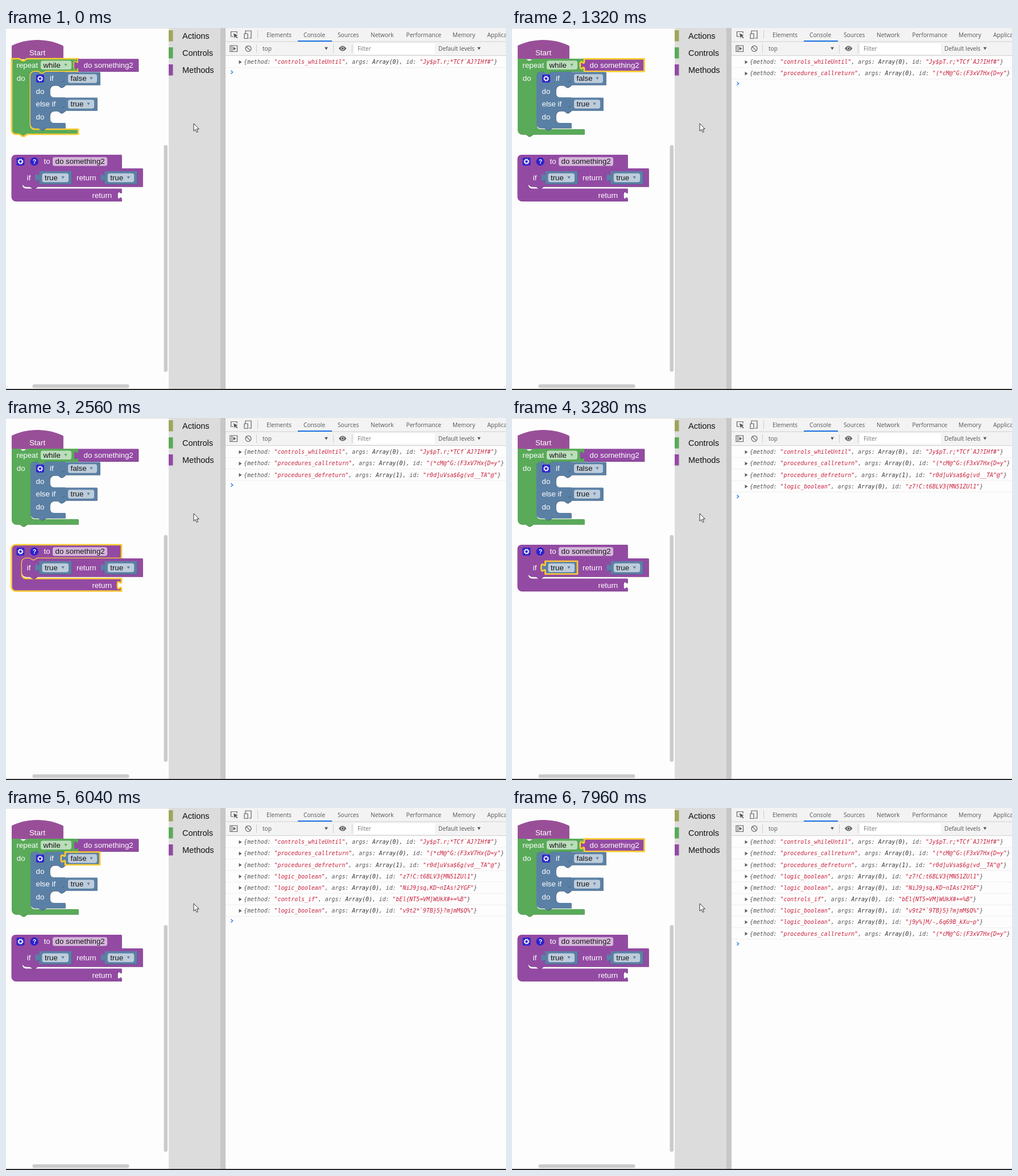
An HTML page for the animation above (8 s loop, 879x637 px).

```html
<!DOCTYPE html>
<html lang="en">
<head>
<meta charset="utf-8">
<title>Block program run</title>
<style>
  html, body { margin: 0; width: 100%; height: 100%; overflow: hidden; background: #fdfdfd; }
  svg { display: block; width: 879px; height: 637px; }
  text { white-space: pre; }
  .label { font: 13.3px "Liberation Sans", Arial, sans-serif; fill: #fff; }
  .value { fill: #151515; }
  .menu { font: 14.5px "Liberation Sans", Arial, sans-serif; fill: #111; }
  .tool { font: 10.2px "Open Sans", "Noto Sans", sans-serif; fill: #555; }
  .log { font: italic 9.88px "DejaVu Sans Mono", monospace; fill: #565656; font-variant-ligatures: none; }
  .log .str { fill: #c8203c; }
  .log .val { fill: #333; }
  .icon { fill: none; stroke: #626262; stroke-width: 1.2; }
  .selected { stroke: #fc3; stroke-width: 2.7; }
</style>
</head>
<body>
<svg id="stage" viewBox="0 0 879 637"></svg>
<script>
const LOOP = 8000;
const STEPS = [0, 840, 1800, 2800, 3800, 4800, 5800, 6800, 7800];
const ROW = 20.15;
const GREEN = '#59aa59', BLUE = '#5b80a5', PURPLE = '#934aa3';

// Block, method name, argument count and id for each step
const CALLS = [
  ['loop', 'controls_whileUntil', 0, 'Jy$pT.r;*TCf`AJ?IHf#'],
  ['call', 'procedures_callreturn', 0, '(*cM@^G:(F3xV7Hx{D=y'],
  ['define', 'procedures_defreturn', 1, 'r0d]uVsa$6g(vd__TA^@'],
  ['test', 'logic_boolean', 0, 'z7!C:t6BLV3{MN51ZUl1'],
  ['result', 'logic_boolean', 0, 'NiJ9jsq,KD~nIAs!2YGF'],
  ['branch', 'controls_if', 0, 'bEl{NT5=VM]WUkX#+=%B'],
  ['first', 'logic_boolean', 0, 'v9t2*`9TB}5}?mjmM$Q%'],
  ['second', 'logic_boolean', 0, 'j9y%]M/-,6q69B_kXu~p'],
  ['call', 'procedures_callreturn', 0, '(*cM@^G:(F3xV7Hx{D=y'],
];

// Path pieces: notches along an edge, puzzle tabs, rounded corners
const NOTCH = 'l5.4,3.6h2.7l5.4,-3.6';
const NOTCH_BACK = 'l-5.4,3.6h-2.7l-5.4,-3.6';
const TAB = 'c0,9,-7.2,-7.2,-7.2,6.75s7.2,-2.25,7.2,6.75';
const TAB_UP = 'c0,-9,-7.2,7.2,-7.2,-6.75s7.2,2.25,7.2,-6.75';
const corner = (dx, dy, sweep) => `a7.2,7.2,0,0,${sweep},${dx * 7.2},${dy * 7.2}`;
const TOP_LEFT = corner(1, -1, 1);
const BOTTOM_LEFT = corner(-1, -1, 1);
const slot = (x, top, bottom, right) =>
  `V${top}H${x + 27}${NOTCH_BACK}H${x + 7.2}${corner(-1, 1, 0)}V${bottom - 7.2}${corner(1, 1, 0)}H${right}`;

const rect = (x, y, w, h, fill, rx = 0) =>
  `<rect x="${x}" y="${y}" width="${w}" height="${h}" rx="${rx}" fill="${fill}"/>`;
const text = (x, y, str, cls = 'label') => `<text x="${x}" y="${y}" class="${cls}">${str}</text>`;
const path = (d, attrs) => `<path d="${d}" ${attrs}/>`;
const icon = d => path(d, 'class="icon"');
const block = (id, d, color) =>
  path(d, `fill="${color}" transform="translate(.8 .8)" style="filter:brightness(.8)"`) +
  path(d, `id="${id}" fill="${color}"`);
const valueBlock = (id, x, y, w, h, color) =>
  block(id, `M${x},${y}h${w}v${h}h${-w}V${y + 18}${TAB_UP}Z`, color);
const field = (x, y, w, str) =>
  rect(x, y, w, 15.5, 'rgba(255,255,255,.6)', 3.6) + text(x + 4.5, y + 12.2, str, 'label value');
const arrow = (x, y, size, color) =>
  path(`M${x - size},${y - size * .8}h${size * 2}l${-size},${size * 1.7}Z`, `fill="${color}"`);
const dropdown = (x, y, w, str, color) => field(x, y, w, str) + arrow(x + w - 10, y + 7.5, 2.6, color);
const boolBlock = (id, x, y, w, str) =>
  valueBlock(id, x, y, w, 22.5, BLUE) + dropdown(x + 5, y + 3.7, w - 10, str, BLUE);
const gear = (x, y) =>
  rect(x - 7, y - 7, 14, 14, '#2b22cb', 3) +
  `<g fill="none" stroke="#fff"><circle cx="${x}" cy="${y}" r="3.1" stroke-width="1.5"/>` +
  `<circle cx="${x}" cy="${y}" r="4.4" stroke-width="1.4" stroke-dasharray="1.7 1.756"/></g>`;

function workspace() {
  return rect(0, 0, 286, 1, '#ddd') +
    rect(277.5, 206, 6.5, 399, '#cbcbcb', 3.2) + rect(46.5, 627, 170, 6.5, '#cbcbcb', 3.2) +
    block('start', 'M10,54V31c27,-13.5,63,-13.5,90,0V54Z', '#994f98') + text(41, 47.5, 'Start') +

    block('loop', `M10,54H23.5${NOTCH}H127V58.5${TAB}${slot(43, 76.5, 178, 127)}` +
      `V187H37${NOTCH_BACK}H17.2${BOTTOM_LEFT}Z`, GREEN) +
    text(18.5, 70, 'repeat') + dropdown(61, 57.6, 54, 'while', GREEN) + text(18.8, 92.5, 'do') +
    valueBlock('call', 127, 54.3, 105.5, 22, PURPLE) + text(136.5, 70, 'do something2') +

    block('branch', `M43,84.2${TOP_LEFT}H56.5${NOTCH}H104V82${TAB}${slot(77, 101, 122, 104)}` +
      `V127${TAB}${slot(77, 146, 167, 104)}V176H70${NOTCH_BACK}H50.2${BOTTOM_LEFT}Z`, BLUE) +
    gear(60, 89) + text(77, 93, 'if') + text(52.5, 116, 'do') +
    text(52.5, 138, 'else if') + text(52.5, 161, 'do') +
    boolBlock('first', 104, 77.5, 61, 'false') + boolBlock('second', 104, 122.5, 56, 'true') +

    block('define', `M9.5,230.2${TOP_LEFT}H203${slot(28, 247, 282.5, 203)}V287.5${TAB}` +
      `V304.5H16.7${BOTTOM_LEFT}Z`, PURPLE) +
    gear(25.5, 235) + '<circle cx="49.7" cy="235" r="7.2" fill="#2b22cb"/>' +
    '<text x="46.7" y="239" class="label" style="font-size:10.5px;font-weight:bold">?</text>' +
    text(66.5, 239.3, 'to') + field(82, 227.2, 96, 'do something2') + text(151.5, 299, 'return') +
    block('guard', `M28,254.2${TOP_LEFT}H41.5${NOTCH}H240V279H55${NOTCH_BACK}H35.2${BOTTOM_LEFT}Z`, PURPLE) +
    text(36.8, 267.5, 'if') + text(124, 267.5, 'return') +
    boolBlock('test', 58.5, 252, 56.5, 'true') + boolBlock('result', 173.7, 252, 56.5, 'true');
}

function toolbox() {
  const items = [['Actions', '#a0a55b'], ['Controls', GREEN], ['Methods', PURPLE]];
  return rect(286, 0, 90.5, 635, '#dcdcdc') + rect(376.5, 0, 9.5, 635, '#c7c7c7') +
    items.map(([name, color], i) =>
      rect(286, 4 + 30 * i, 7.5, 19.5, color) + text(310, 19 + 30 * i, name, 'menu')).join('') +
    path('M330,168v13.4l3.1,-2.9l2.1,5l2.2,-1l-2.1,-4.8h4Z', 'fill="#fff" stroke="#333" stroke-width="1"');
}

function consoleTools() {
  const tabs = [['Elements', 458], ['Console', 523], ['Sources', 583], ['Network', 641],
    ['Performance', 703.5], ['Memory', 785], ['Application', 846]];
  return rect(386, 0, 493, 48, '#f3f3f3') + rect(386, 23.5, 493, 1, '#d0d0d0') +
    rect(386, 48, 493, 1, '#d0d0d0') + rect(513, 22, 60, 2, '#1a73e8') +
    tabs.map(([name, x]) => text(x, 15.8, name, 'tool')).join('') +
    [[442, 4], [440, 29], [575, 29], [608, 29]].map(([x, y]) => rect(x, y, 1, 15, '#ccc')).join('') +
    icon('M400,15h-4.5v-8.5h10.5v3') +
    path('M400,9.5l7.5,3.2l-3,1.2l3,3.2l-1.2,1.2l-3.2,-3.2l-1.4,3Z', 'fill="#555"') +
    icon('M421,10v-5h10v13h-4M419,10h6v8.5h-6Z') +
    icon('M394,31h12.5v10.5h-12.5ZM397.2,31v10.5') + path('M399.5,33l5,3.3l-5,3.3Z', 'fill="#626262"') +
    icon('M421,36.3a5,5,0,1,0,10,0a5,5,0,1,0,-10,0M422.6,32.8l7,7') +
    text(451, 39.7, 'top', 'tool') + arrow(563, 36, 2.9, '#555') +
    path('M585,36q6.7,-9,13.4,0q-6.7,9,-13.4,0Z', 'fill="#626262"') +
    '<circle cx="591.7" cy="36" r="2.6" fill="#626262" stroke="#f3f3f3"/>' +
    rect(612, 27, 142, 19, '#fff') +
    '<text x="618" y="39.8" class="tool" style="fill:#777">Filter</text>' +
    text(760, 39.7, 'Default levels', 'tool') + arrow(831.5, 36, 2.9, '#555');
}

function logRow([, method, count, id], i) {
  const y = 60 + ROW * i;
  return `<g class="row">${path(`M409.5,${y - 3.3}l5,3.3l-5,3.3Z`, 'fill="#606060"')}` +
    text(418, y + 3.3, `{method: <tspan class="str">"${method}"</tspan>, args: ` +
      `<tspan class="val">Array(${count})</tspan>, id: <tspan class="str">"${id}"</tspan>}`, 'log') +
    rect(386, y + 9.2, 493, 1, '#efefef') + '</g>';
}

const stage = document.getElementById('stage');
stage.innerHTML = rect(0, 0, 879, 637, '#fdfdfd') + workspace() + toolbox() + consoleTools() +
  CALLS.map(logRow).join('') +
  path('M395.3,74.8l3.4,2.9l-3.4,2.9', 'id="prompt" fill="none" stroke="#3b82e0" stroke-width="1.4"') +
  rect(0, 635.2, 879, 1.8, '#111');

const rows = [...stage.querySelectorAll('.row')];
const prompt = document.getElementById('prompt');
let shown = -1;

function draw(now) {
  const time = now % LOOP;
  const step = STEPS.filter(start => start <= time).length - 1;
  if (step !== shown) {
    shown = step;
    rows.forEach((row, i) => row.style.display = i <= step ? '' : 'none');
    prompt.setAttribute('transform', `translate(0 ${ROW * step})`);
    stage.querySelector('.selected')?.classList.remove('selected');
    document.getElementById(CALLS[step][0]).classList.add('selected');
  }
  requestAnimationFrame(draw);
}
draw(performance.now());
</script>
</body>
</html>
```
